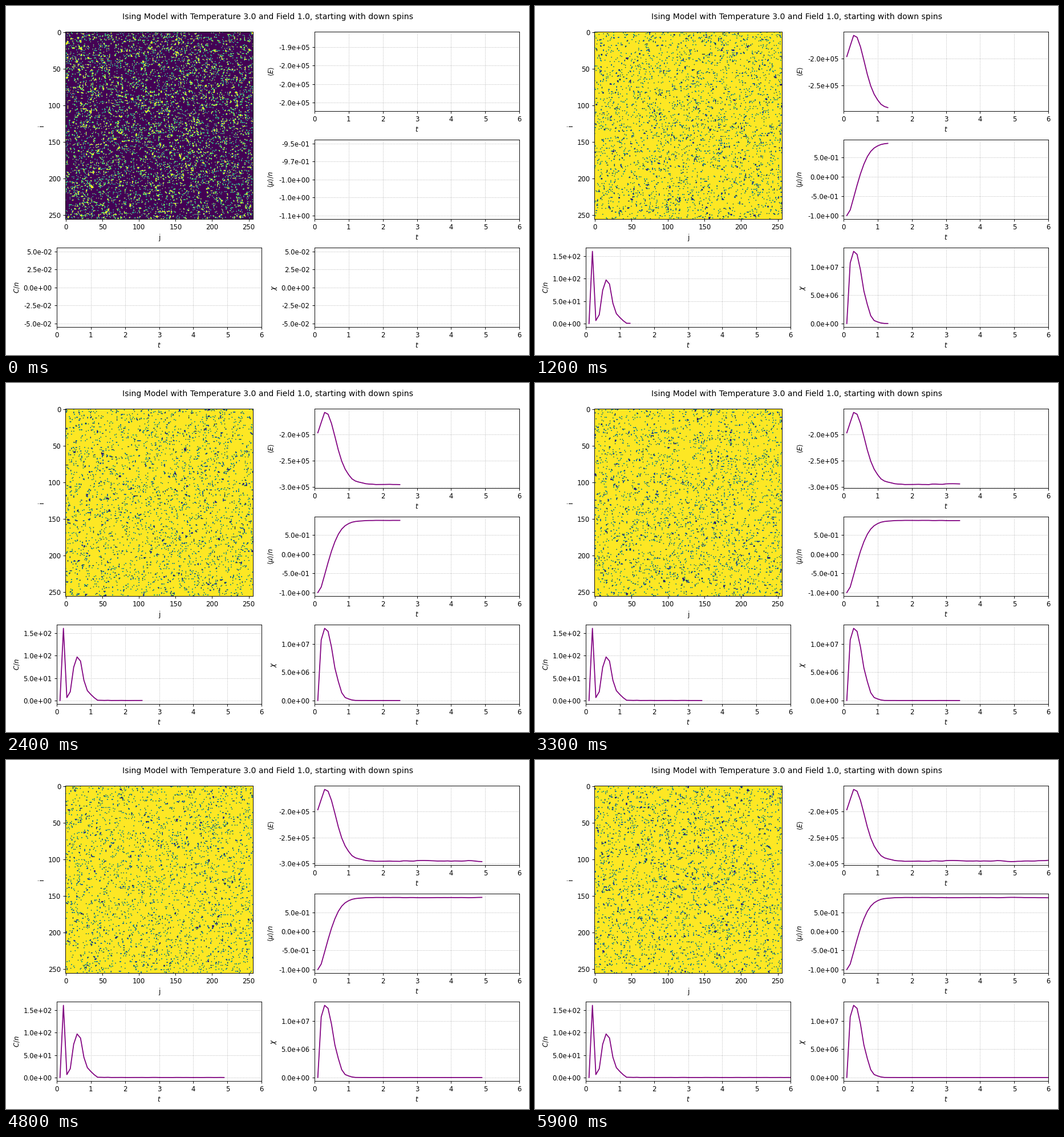
Write a matplotlib script that moves like this. It is 917x611 px and loops after 6 s.

```python
import numpy as np
import matplotlib.pyplot as plt
from matplotlib.animation import FuncAnimation
from matplotlib.ticker import FormatStrFormatter

W, H, DPI = 917, 611, 84
FRAMES, SIZE = 60, 256
SITES = SIZE * SIZE
TEMP, FIELD = 3.0, 1.0
SUBSTEPS = 20

plt.rcParams["font.family"] = "DejaVu Sans"


def neighbours(spins):
    return sum(np.roll(spins, d, axis) for d in (1, -1) for axis in (0, 1))


def metropolis(spins, near, rng):
    """Try to flip a random share of the sites, 1 / SUBSTEPS of a sweep."""
    cost = 2 * spins * (near + FIELD)
    chance = np.exp(-np.maximum(cost, 0) / TEMP) / SUBSTEPS
    roll = rng.random(spins.shape, dtype=np.float32)
    return np.where(roll < chance, -spins, spins)


def simulate(seed=7):
    """Lattice after each sweep, with energy and moment after each substep."""
    rng = np.random.default_rng(seed)
    spins = -np.ones((SIZE, SIZE), dtype=np.float32)
    states, energy, moment = [], [], []
    for step in range(FRAMES * SUBSTEPS):
        near = neighbours(spins)
        total = spins.sum()
        # The constant makes the all-down lattice start at -3 per site.
        energy.append(-(spins * near).sum() / 2 - FIELD * total - 2 * SITES)
        moment.append(total)
        spins = metropolis(spins, near, rng)
        if (step + 1) % SUBSTEPS == 0:
            states.append(spins)
    return states, np.array(energy, float), np.array(moment, float)


def sweep_stats(trace):
    """Mean and variance in each sweep, after a first entry at rest."""
    middle = (trace + np.append(trace[1:], trace[-1])) / 2
    rows = middle.reshape(FRAMES, SUBSTEPS)[:-1]
    mean = np.append(trace[0], rows.mean(axis=1))
    return mean, np.append(0, rows.var(axis=1))


states, energy, moment = simulate()
energy_mean, energy_var = sweep_stats(energy)
moment_mean, moment_var = sweep_stats(moment)
time = np.arange(1, FRAMES + 1) / 10

fig = plt.figure(figsize=(W / DPI, H / DPI), dpi=DPI, facecolor="white")
fig.suptitle("Ising Model with Temperature 3.0 and Field 1.0, "
             "starting with down spins")


def add_axes(left, top, width, height):
    """Axes placed in pixels from the top left corner."""
    return fig.add_axes([left / W, 1 - (top + height) / H, width / W, height / H])


def add_plot(left, top, label):
    ax = add_axes(left, top, 359.6, 139)
    ax.set_xlim(0, 6)
    ax.set_xlabel("$t$")
    ax.set_ylabel(label)
    ax.yaxis.set_major_formatter(FormatStrFormatter("%.1e"))
    ax.grid(linestyle=":")
    line, = ax.plot([], [], color="purple")
    return ax, line


lattice_ax = add_axes(104.4, 45.2, 328.2, 328)
image = lattice_ax.imshow(states[0], vmin=-1, vmax=1, cmap="viridis", aspect="auto")
lattice_ax.set_xlabel("j")
lattice_ax.set_ylabel("i")

LEFT, RIGHT = 88.7, 540.7
plots = [
    (*add_plot(RIGHT, 45.2, r"$\langle E \rangle$"), energy_mean),
    (*add_plot(RIGHT, 234.2, r"$\langle \mu \rangle / n$"), moment_mean / SITES),
    (*add_plot(LEFT, 423.2, "$C/n$"), energy_var / TEMP**2 / SITES),
    (*add_plot(RIGHT, 423.2, r"$\chi$"), moment_var / TEMP),
]


def update(k):
    image.set_data(states[k])
    for ax, line, values in plots:
        line.set_data(time[:k + 1], values[:k + 1])
        ax.relim()
        ax.autoscale_view(scalex=False)
    return [image] + [line for _, line, _ in plots]


anim = FuncAnimation(fig, update, frames=FRAMES, interval=100,
                     repeat=True, repeat_delay=0, blit=False)
plt.show()
```
